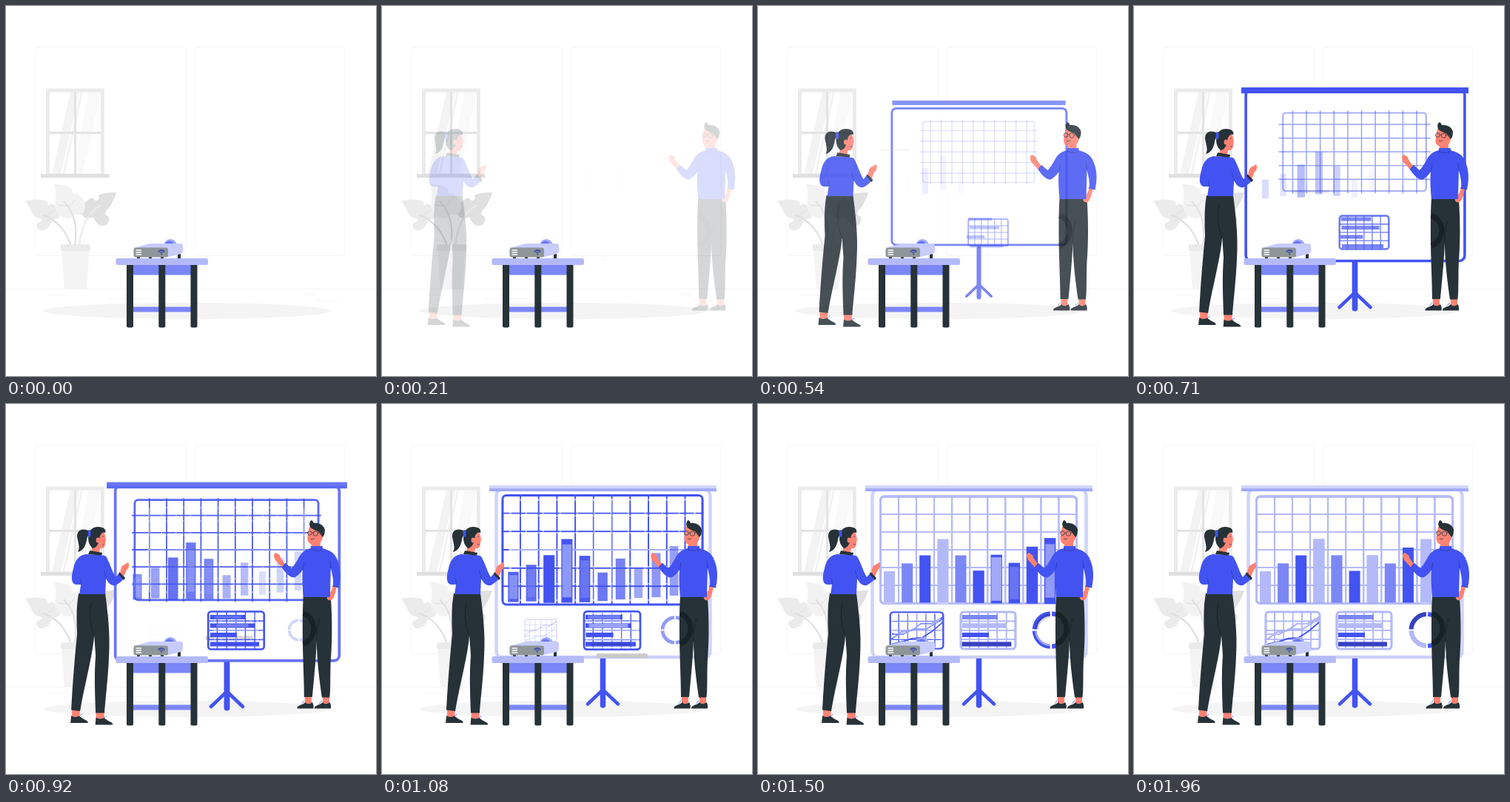
Write an HTML page that moves like this. It is 500 px wide and 500 px high and loops after 2000 ms.

```html
<!DOCTYPE html>
<html lang="en">
<head>
<meta charset="utf-8">
<title>Presentation</title>
<style>
html, body { margin: 0; width: 100%; height: 100%; overflow: hidden; background: #fff; }
svg { display: block; width: 100vw; height: 100vh; }
.zoom { transform-box: fill-box; transform-origin: center; opacity: 0; }
.pin { transform-box: view-box; }
.line { fill: none; stroke: #4353f1; }
.white { stroke: #fff; }
.dark { fill: #263238; }
.blue { fill: #4353f1; }
.skin { fill: #ff8272; }
</style>
</head>
<body>
<svg viewBox="0 0 500 500">
  <!-- room -->
  <g fill="none" stroke="#f5f5f5">
    <rect x="39" y="55.5" width="204" height="282" rx="4"/>
    <rect x="255" y="55.5" width="203" height="282" rx="4"/>
    <path d="M0 382.5H500M57 390.5H85M135 395.5H200M400 389.5H417M418 398.5H449"/>
  </g>
  <ellipse cx="245" cy="412" rx="194" ry="11" fill="#f4f4f4"/>
  <path d="M87 116H99L74 228H62ZM101 116H104L79 228H76Z" fill="#f3f3f3"/>
  <path d="M112 116H128V118L103 228H90Z" fill="#f9f9f9"/>
  <path d="M93.500 116V228M58 171.500H129" stroke="#e4e4e4" stroke-width="3"/>
  <rect x="56.500" y="114" width="74" height="115" fill="none" stroke="#ebebeb" stroke-width="5"/>
  <rect x="47" y="227" width="92.500" height="5" fill="#e0e0e0"/>

  <!-- plant -->
  <path fill="#e0e0e0" d="M149 252C142 252 132 252 125 256C126 260 125 263 122 263C119 263 119 260 117 259C105 264 98 274 103 283C107 289 113 287 118 285C121 291 124 297 131 297C139 297 141 288 138 284C134 283 133 279 136 276C142 271 146 261 149 252Z"/>
  <path fill="#ebebeb" d="M26 263C42 261 51 261 56 265C55 269 58 271 61 267C69 270 75 276 73 283C71 289 65 289 62 287C62 296 56 304 46 303C41 302 40 297 43 292C48 293 50 289 46 287C36 287 33 272 26 263Z"/>
  <path fill="#f2f2f2" d="M65 241C75 241 84 243 90 248C87 252 91 256 96 253C104 259 109 268 106 276C104 282 99 284 94 281C89 288 81 289 75 284C67 279 65 272 67 265C68 256 67 248 65 241Z"/>
  <g fill="none" stroke="#dfdfdf" stroke-width="2">
    <path d="M50 283C70 289 82 305 89 327M78 264C95 280 97 307 92 327"/>
    <path d="M128 269C108 280 100 305 99 327" stroke="#ebebeb"/>
    <path d="M54 284L66 276M85 272L93 262M82 270L71 269M113 283L121 284M119 275L115 268" stroke-width="1"/>
  </g>
  <path d="M75 329H113L109 383H79Z" fill="#f4f4f4"/>
  <rect x="74" y="322" width="40" height="9" rx="3" fill="#ebebeb"/>

  <g id="board"></g>

  <!-- man -->
  <g class="slide" data-x="30">
    <path class="skin" d="M405 394H414V405H405ZM429 394H438V405H429Z"/>
    <path id="shoe" class="dark" d="M406 403C407 406 412 406 415 403C417 406 417 409 416.500 411.500H394.500C394 407 402 407 406 403Z"/>
    <use href="#shoe" x="23.500"/>
    <path d="M401 405L404 401M424 405L428 401" stroke="#7b87f6"/>
    <path class="dark" d="M403 260H440C442 290 442 320 440 345C439 365 440 385 438.500 396.500H428C425 375 421 345 421 320C420 345 417 375 415 396H404C404 370 402 340 402 310C402 290 402 275 403 260Z"/>
    <path d="M403 283A22 22 0 0 1 403 324" fill="none" stroke="#182126" stroke-width="7"/>
    <path d="M421 320C421 308 422 298 425 290" fill="none" stroke="#182126"/>
    <path class="skin" d="M378 216C375 211 372 209 371 204L366 201C362 202 363 207 365 211C368 214 371 217 374 221ZM443 246L448 248C446 255 445 262 441 265C437 266 434 264 435 260C437 257 441 255 443 246ZM414 180H426V196H414Z"/>
    <path class="blue" d="M413 192H429V195C440 198 446 202 449 211C454 222 454 236 451 248L443 246C444 236 442 230 440 222L439 261H403C402 250 401 236 402 224C400 227 397 231 392 234C387 236 380 230 374 221L379 215L387 222C390 219 394 213 397 207C401 200 405 197 413 195Z"/>
    <path d="M374 221L379 215M442 246L451.500 248M413 196C418 199 425 199 429 196M402 224L404 214M440 222L439 212" fill="none" stroke="#303db4"/>
    <path class="skin" d="M411 166H429V181C427 188 423 191 417 190.500C411 190 408 186 408.500 180Z"/>
    <path class="dark" d="M412 159C413 156 416 157 417 161C424 160 431 164 432 170C432 175 431 178 429 180L426 176C424 170 415 171 412 166C411 163 411 161 412 159Z"/>
    <g fill="none" stroke="#354052" stroke-width=".9">
      <circle cx="411.500" cy="174.500" r="2.800"/><circle cx="419.500" cy="175" r="3.200"/>
      <path d="M414.300 174H416.500M422.500 174L429 175M413 182.500Q416 183.500 418 181.500"/>
    </g>
  </g>

  <!-- woman -->
  <g class="slide" data-x="-30">
    <path class="skin" d="M88 412H98.500V424H88ZM120.500 415H131.500V427H120.500Z"/>
    <path id="flat" class="dark" d="M87 421C91 424 95 423 98 421.500C102 426 109 427 110 430.500L108 431H86Z"/>
    <use href="#flat" x="33.500" y="2.500"/>
    <path d="M97 422L102 419M130 424L135 422" stroke="#7b87f6"/>
    <path class="dark" d="M97 256H133C136 280 140 310 138 340C137 370 133 400 132 417.500H120C119 390 118 365 120 340L118 312C117 335 106 375 99 415L87 413.500C89 375 92 340 95 310C94 290 94 272 97 256Z"/>
    <path d="M118 314C114 302 110 288 114 268" fill="none" stroke="#182126"/>
    <path class="skin" d="M117 176L128 172C133 173 133 179 134 183L133 187C133 193 130 196 126 195L125 201H114L116 190Z"/>
    <path class="skin" d="M153 229C154 222 155 218 159 217L164 214C166 218 165 222 162 224C160 228 159 232 157 234Z"/>
    <path class="blue" d="M107 203C97 204 92 212 90 222C87 232 86 242 93 244L100 244L98 257H133L134 236C138 244 143 246 147 245C152 242 156 239 159 235L152 228L147 234C142 226 139 214 134 206C130 203 118 204 107 203Z"/>
    <path class="dark" d="M112 198L129 201L128 204.500L110 203ZM152 227L160 235L158 238L151 230Z"/>
    <path class="dark" d="M111 172C103 167 94 170 95 180C97 190 99 194 96 200C104 198 107 190 108 183C109 178 112 176 111 172ZM110 180C110 168 120 164 129 167C133 168 134 172 133 174C129 172 126 176 125 182C124 190 120 195 116 195C111 190 110 186 110 180Z"/>
    <ellipse class="blue" cx="111.500" cy="175" rx="2" ry="5"/>
    <ellipse class="skin" cx="123" cy="184" rx="2.500" ry="3.500"/>
    <path d="M130 178V180M129 190L132 189.500M99 235L101 243M134 236L131 224" fill="none" stroke="#303db4" stroke-width=".8"/>
  </g>

  <!-- table and projector -->
  <path d="M168 350H254V363.500H168ZM168 406.500H254V413.500H168Z" fill="#7b87f6"/>
  <g class="dark">
    <rect x="163" y="345" width="9" height="89.500" rx="2"/>
    <rect x="206.300" y="345" width="9" height="89.500" rx="2"/>
    <rect x="249.500" y="345" width="9" height="89.500" rx="2"/>
    <path d="M177 338H181V342H177ZM193 338H197V342H193ZM209 338H213V342H209ZM232 333H236V342H232Z"/>
  </g>
  <rect x="148.500" y="341" width="124.500" height="9" rx="2" fill="#b4baf9"/>
  <circle cx="222" cy="324" r="9" fill="#a1a9f8"/>
  <circle cx="221" cy="324" r="6.500" fill="#6977f4"/>
  <path d="M173 327L194 321H236Q239 321 239 324V332Q239 334 236 335L217 339.500Z" fill="#c7ccfc"/>
  <rect x="172.500" y="326.500" width="46.500" height="13" rx="3" fill="#8f9699"/>
  <path d="M175.500 330H183M175.500 333H183M175.500 336H183" stroke="#fff" stroke-width="1.300"/>
  <path d="M205.500 332Q210 328 214.500 332M207.500 333.500Q210 331.500 212.500 333.500" fill="none" stroke="#303db4" stroke-width="1.200"/>
  <circle cx="210" cy="335" r="1" fill="#303db4"/>
</svg>
<script>
const LOOP = 2000, BLUE = '#4353f1';

// A part that grows about its centre: delay, size at the start, strongest opacity
const zoom = (body, delay, from = .5, max = 1, origin = '') =>
  `<g class="zoom ${origin && 'pin'}" data-d="${delay}" data-from="${from}" data-max="${max}"` +
  `${origin && ` style="transform-origin:${origin}"`}>${body}</g>`;

const rect = (x, y, w, h, attrs) => `<rect x="${x}" y="${y}" width="${w}" height="${h}" ${attrs}/>`;

// Blue lines that a translucent white copy turns pale later
const paled = (shape, delay, later) =>
  zoom(shape('line'), delay) + zoom(shape('line white'), later, .5, .6);

const grid = (x, y, w, h, x0, dx, y0, dy, width) => cls => {
  let d = '';
  for (let gx = x0; gx < x + w - 2; gx += dx) d += `M${gx} ${y}v${h}`;
  for (let gy = y0; gy < y + h - 2; gy += dy) d += `M${x} ${gy}h${w}`;
  return `<path class="${cls}" d="${d}" stroke-width="${width}"/>`;
};

const frame = (x, y, w, h, r, width) => cls =>
  rect(x, y, w, h, `rx="${r}" class="${cls}" stroke-width="${width}"`);

const tinted = (x, y, w, h, delay, later, tint, max) =>
  zoom(rect(x, y, w, h, `fill="${BLUE}"`), delay) +
  (max ? zoom(rect(x, y, w, h, `fill="${tint}"`), later, .5, max) : '');

function screen() {
  const stand = `<path class="line" stroke-width="7.5" d="M298.500 326V407" stroke-linecap="round"/>
    <path class="line" stroke-width="4.500" stroke-linecap="round" d="M278 405.500L298.500 386L319 405.500"/>`;
  const panel = rect(154.5, 116, 289, 226, `rx="7" fill="#fff" stroke="${BLUE}" stroke-width="3.500"`) +
    rect(154.5, 116, 289, 226, 'rx="7" class="line white pale" stroke-width="3.500"');
  const bar = rect(145, 110, 307, 8, `fill="${BLUE}"`) +
    rect(145, 110, 307, 4.5, 'fill="#fff" class="pale" data-max=".75"') +
    rect(145, 114.5, 307, 3.5, 'fill="#fff" class="pale" data-max=".5"');
  return zoom(stand, 0, 0, 1, '298.5px 333px') +
    zoom(panel, 0, 0, 1, '298.5px 238px') +
    zoom(bar, 30, 0, 1, '298.5px 185px') +
    zoom(rect(283, 329, 67, 5.5, 'fill="#cacaca" id="shade"'), 322, .5, 1, '0 0');
}

function barChart() {
  const tops = [226, 215.5, 204.5, 182.5, 204.5, 225.5, 204.5, 215.5, 194, 182.5];
  const delays = [475, 510, 380, 400, 440, 555, 590, 690, 650, 670];
  return paled(grid(165.5, 125, 265, 144.5, 190, 24.05, 149, 24, 1.9), 305, 480) +
    paled(frame(165.5, 125, 265, 144.5, 5, 3), 345, 500) +
    tops.map((y, i) => tinted(170 + 24.12 * i, y, 15, 268.5 - y, delays[i],
      delays[i] + (i < 6 ? 220 : 360), '#fff', [.6, .3, 0][i % 3])).join('');
}

function list() {
  const rows = [[285, 48, '#fff', .3], [296.5, 60, '#fff', .6], [309, 36, '#fff', 0], [321.5, 66, '#000', .2]];
  return paled(grid(274, 281, 74, 50, 286, 12.4, 293.5, 12.4, 1.4), 180, 480) +
    paled(frame(274, 281, 74, 50, 4, 2.6), 180, 510) +
    rows.map(([y, w, tint, max], i) => tinted(276, y, w, 6, 230, 540 + 30 * i, tint, max)).join('');
}

function lineChart() {
  const curve = d => cls => `<path class="${cls}" d="${d}" stroke-width="1.900"/>`;
  return paled(grid(178, 281, 73, 50, 190, 12.3, 293.5, 12.4, 1.4), 840, 940) +
    paled(frame(178, 281, 73, 50, 4, 2.6), 860, 950) +
    paled(curve('M180 318L194 308L208 306L220 297L234 297L250 288'), 850, 950) +
    paled(curve('M180 311H196L210 304L228 304L250 290'), 870, 960) +
    zoom(curve('M180 325L196 321L208 317L222 316L236 307L250 295')('line'), 870);
}

function donut() {
  const ring = (color, dash, turn) => `<circle cx="396" cy="305.500" r="21.500" fill="none" stroke="${color}"
    stroke-width="6" pathLength="4" stroke-dasharray="${dash}" stroke-dashoffset="${-turn - .035}"/>`;
  return zoom(ring(BLUE, '.93 .07', 0), 660) +
    zoom(ring('#fff', '.93 3.07', 1), 980, .5, .6) +
    zoom(ring('#000', '.93 3.07', 2), 960, .5, .2);
}

document.getElementById('board').innerHTML = screen() + barChart() + list() + lineChart() + donut();

const all = s => [...document.querySelectorAll(s)];
const zooms = all('.zoom'), slides = all('.slide'), pales = all('.pale');
const shade = document.getElementById('shade');
const clamp = v => Math.max(0, Math.min(1, v));
const bezier = (a, b, u) => 3 * (1 - u) ** 2 * u * a + 3 * (1 - u) * u * u * b + u ** 3;

// One second of cubic-bezier(.36, -.01, .5, 1.38)
function ease(ms) {
  const x = clamp(ms / 1000);
  if (x === 0 || x === 1) return x;
  let lo = 0, hi = 1;
  for (let i = 0; i < 20; i++) {
    const mid = (lo + hi) / 2;
    if (bezier(.36, .5, mid) < x) lo = mid; else hi = mid;
  }
  return bezier(-.01, 1.38, lo);
}

function draw(t) {
  for (const el of zooms) {
    const { d, from, max } = el.dataset, p = ease(t - d);
    el.style.transform = `scale(${Math.max(0, +from + (1 - from) * p)})`;
    el.style.opacity = max * clamp(from === '0' ? Math.max(0, p) ** 1.8 : p);
  }
  const p = ease(t + 20);
  for (const el of slides) {
    el.setAttribute('transform', `translate(${el.dataset.x * (1 - p)})`);
    el.style.opacity = clamp(p);
  }
  for (const el of pales) el.style.opacity = (el.dataset.max || .75) * clamp((t - 860) / 220);
  shade.style.opacity = clamp((1300 - t) / 200);
}

let start;
function tick(now) {
  start ??= now;
  draw((now - start) % LOOP);
  requestAnimationFrame(tick);
}
draw(0);
requestAnimationFrame(tick);
</script>
</body>
</html>
```
